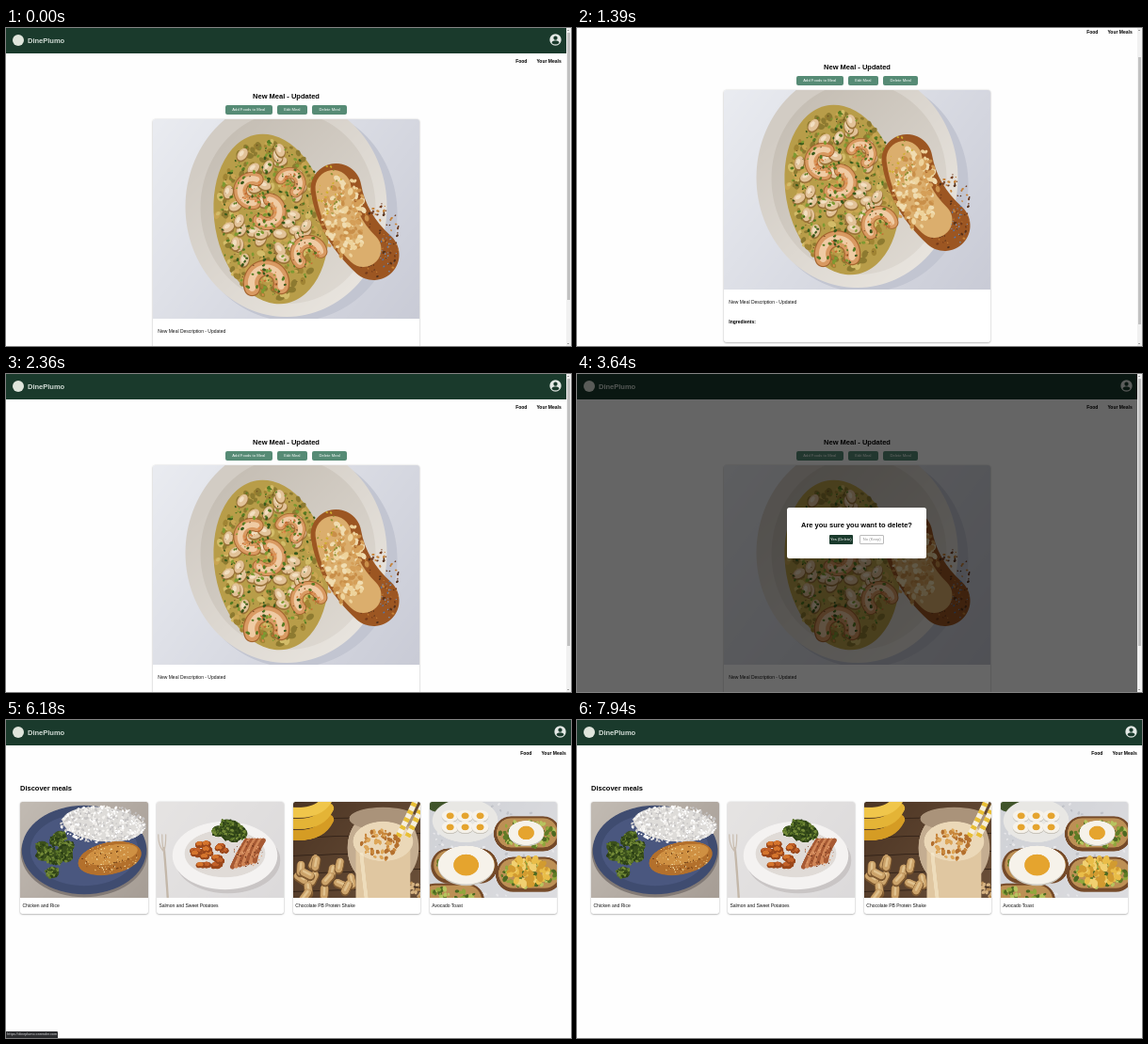
These frames come from a looping animation (600 by 338 pixels, 8000 ms). An HTML page with a canvas:

```html
<!DOCTYPE html>
<html lang="en">
<head>
<meta charset="utf-8">
<title>Meal planner</title>
<style>
html, body { margin: 0; width: 100%; height: 100%; overflow: hidden; background: #fefefe; }
#stage { position: absolute; left: 0; top: 0; width: 600px; height: 338px; overflow: hidden;
  background: #fefefe; font: 5px/10px "Liberation Sans", Arial, sans-serif; color: #111; white-space: nowrap; }
#stage div, canvas { position: absolute; box-sizing: border-box; }
.fill { left: 0; top: 0; width: 100%; height: 100%; }
.b { font-weight: bold; color: #000; }
.h { font-size: 7.5px; }
.mid { left: 0; width: 100%; text-align: center; }
.bar { left: 0; top: 0; width: 100%; height: 27px; background: #1a3a2c; }
.logo { left: 7px; top: 6.5px; width: 12px; height: 12px; border-radius: 50%; background: #dfe5dc; }
#stage .row { display: flex; justify-content: center; gap: 5px; }
#stage .row div { position: static; height: 10px; padding: 0 7.5px; font-size: 4.167px;
  color: #fff; background: #568b75; border-radius: 2px; }
#modal .row { gap: 7.5px; }
#stage #modal .row div { padding: 0 1.2px; background: #1a3a2c; border-radius: 1px; }
#stage #modal .row .no { padding: 0 2.4px; line-height: 8px; background: #fff; color: #8b8b8b; border: 1px solid #bbb; }
.card { background: #fff; border-radius: 2.5px; overflow: hidden; box-shadow: 0 .6px 1.8px rgba(0,0,0,.42); }
#page { left: 0; top: 0; height: 338px; }
#shade { left: 0; top: 0; width: 595px; height: 338px; background: rgba(0,0,0,.6); }
#modal { left: 223px; top: 142px; width: 148px; height: 54px; background: #fff; border-radius: 2.5px; }
#track { left: 595px; top: 0; width: 5px; height: 338px; background: #f1f1f1; }
#thumb { left: .6px; width: 3.8px; height: 284px; background: #c1c1c1; }
.arrow { left: 1.2px; border: 1.3px solid transparent; }
#link { left: 0; bottom: 0; padding: 0 1.3px; background: #2b2c2e; color: #d4d5d7;
  font: 3.7px/7px Roboto, "Open Sans", sans-serif; border-top-right-radius: 1px; }
</style>
</head>
<body>
<div id="stage">
  <div id="page">
    <div class="bar"></div>
    <div class="logo"></div>
    <div class="b h" style="left:23px;top:8.7px;color:#d3ddd7">DinePlumo</div>
    <canvas id="user" style="right:5px;top:6px"></canvas>
    <div class="b" style="right:41.6px;top:30px">Food</div>
    <div class="b" style="right:5.3px;top:30px">Your Meals</div>

    <div id="detail" class="fill">
      <div class="b h mid" style="top:67.5px">New Meal - Updated</div>
      <div class="row mid" style="top:82px"><div>Add Foods to Meal</div><div>Edit Meal</div><div>Delete Meal</div></div>
      <div class="card" style="left:156px;top:97px;width:283px;height:268px">
        <canvas id="meal"></canvas>
        <div style="left:5.3px;top:219.7px">New Meal Description - Updated</div>
        <div class="b" style="left:5.3px;top:240.5px">Ingredients:</div>
      </div>
    </div>

    <div id="list" class="fill">
      <div class="b h" style="left:15px;top:67.5px">Discover meals</div>
    </div>
  </div>

  <div id="shade">
    <div id="modal">
      <div class="b h mid" style="top:14.2px">Are you sure you want to delete?</div>
      <div class="row mid" style="top:29px"><div>Yes (Delete)</div><div class="no">No (Keep)</div></div>
    </div>
  </div>
  <div id="track">
    <div class="arrow" style="top:.6px;border-bottom-color:#555"></div>
    <div id="thumb"></div>
    <div class="arrow" style="bottom:.6px;border-top-color:#555"></div>
  </div>
  <div id="link"></div>
</div>

<script>
const $ = id => document.getElementById(id);
const TAU = Math.PI * 2;
let c, seed;

function rnd() {
  seed = (seed * 1664525 + 1013904223) >>> 0;
  return seed / 4294967296;
}
const between = (a, b) => a + (b - a) * rnd();
const pick = list => list[Math.floor(rnd() * list.length)];

// Photos are drawn with 0, 0 at the centre of the picture.
function paint(el, w, h, draw) {
  el.width = w * 2;
  el.height = h * 2;
  el.style.width = w + "px";
  el.style.height = h + "px";
  c = el.getContext("2d");
  c.scale(2, 2);
  c.translate(w / 2, h / 2);
  seed = 77;
  draw(w, h);
}
function fade(w, h, from, to) {
  const g = c.createLinearGradient(-w / 2, -h / 2, w / 2, h / 2);
  g.addColorStop(0, from);
  g.addColorStop(1, to);
  return g;
}
function wash(w, h, from, to) {
  c.fillStyle = fade(w, h, from, to);
  c.fillRect(-w / 2, -h / 2, w, h);
}
function oval(x, y, rx, ry, fill, rot = 0) {
  c.fillStyle = fill;
  c.beginPath();
  c.ellipse(x, y, rx, ry, rot, 0, TAU);
  c.fill();
}
function bend(x0, y0, mx, my, x1, y1, width, color, cap = "round") {
  c.beginPath();
  c.moveTo(x0, y0);
  c.quadraticCurveTo(mx, my, x1, y1);
  c.lineWidth = width;
  c.strokeStyle = color;
  c.lineCap = cap;
  c.stroke();
}
// Calls draw at n random places inside an oval.
function strew(n, x, y, rx, ry, draw) {
  for (let i = 0; i < n; i++) {
    const a = rnd() * TAU, d = Math.sqrt(rnd());
    draw(x + Math.cos(a) * d * rx, y + Math.sin(a) * d * ry);
  }
}
function specks(n, x, y, rx, ry, size, colors) {
  strew(n, x, y, rx, ry, (px, py) => {
    const s = size * between(.4, 1);
    oval(px, py, s, s * .7, pick(colors), rnd() * 3);
  });
}
function shrimp(x, y, r, turn) {
  [[r * 1.1, "#a5652f"], [r * .95, "#d99a62"], [r * .45, "#efcba4"]].forEach(([width, color]) => {
    c.beginPath();
    c.arc(x, y, r, turn, turn + 3.7);
    c.lineWidth = width;
    c.strokeStyle = color;
    c.lineCap = "round";
    c.stroke();
  });
  specks(20, x, y, r, r, 1.6, ["#c46c32", "#dd8d4c"]);
}

const HERBS = ["#557b22", "#38591a", "#7d9a32"];
const CRUMB = ["#eed39c", "#c98f49", "#f0dcb0", "#d59f58"];

function stew(w, h) {
  wash(w, h, "#eaecf1", "#c9cbd6");
  oval(8, -6, 110, 115, "#c2c5d1");
  oval(0, -13, 107, 117, fade(150, 150, "#d2ccc4", "#e8e4de"));
  oval(2, -12, 93, 102, fade(150, 150, "#c6bfb5", "#dfdad3"));
  oval(-16, 0, 60, 91, "#b89d49", -.17);
  specks(260, -17, 0, 57, 86, 5, ["#a08433", "#d3bc69", "#8d7a30", "#c9a552"]);
  strew(38, -22, -14, 50, 66, (x, y) => {
    const turn = rnd() * 3;
    oval(x, y + 1, 7.8, 5.5, "#9a7238", turn);
    oval(x, y, 7, 4.8, "#e2c298", turn);
    oval(x - 1, y - 1, 3.5, 2, "#f2dfc1", turn);
  });
  shrimp(-36, -30, 13, 1.4);
  shrimp(-20, -8, 13, 4.9);
  shrimp(4, -38, 11, 3.6);
  shrimp(-21, 68, 16, 2.8);
  shrimp(24, 37, 13, 2.4);
  specks(240, -16, -2, 56, 84, 2.2, HERBS);
  specks(90, -16, -2, 56, 84, .9, ["#463018", "#6b4a20"]);
  bend(53, -32, 60, 8, 93, 38, 54, "#9c5622");
  specks(90, 98, 24, 24, 42, 1.7, ["#71391a", "#c78238", "#54301a"]);
  bend(50, -33, 55, 6, 82, 32, 38, "#dbae6d");
  specks(150, 62, -2, 24, 44, 4.2, CRUMB);
  specks(40, 46, -30, 14, 28, 1.5, ["#8d9135", "#d1b02e"]);
  specks(24, 108, 36, 9, 23, 1.1, ["#4c78b4", "#7795bd"]);
}
function broccoli(n, x, y, rx, ry) {
  strew(n, x, y, rx, ry, (px, py) => {
    oval(px, py, 7, 6, "#3c511d");
    specks(25, px, py, 7, 6, 2, ["#5c7629", "#2c4016", "#748a38"]);
  });
}
function chicken(w, h) {
  wash(w, h, "#c2bbb3", "#a69d95");
  oval(0, 3, 67, 47, "#827a76");
  oval(0, 0, 66, 47, "#3f4c70");
  oval(0, 0, 57, 38, "#4a577f");
  oval(20, -27, 43, 18, "#dedcd9", .1);
  specks(450, 20, -27, 45, 20, 1.8, ["#fff", "#f4f2ef", "#c6c4c4"]);
  broccoli(14, -32, 6, 18, 22);
  oval(27, 9, 34, 17, "#b3702c", -.2);
  oval(29, 5, 28, 10, "#cf9042", -.2);
  specks(130, 27, 9, 30, 15, 1, ["#f0d8a0", "#704018", "#e2b568"]);
}
function salmon(w, h) {
  wash(w, h, "#e6e4e3", "#dcdadb");
  bend(-60, -2, -58, 20, -56, 50, 2.3, "#c3b7a9");
  for (let x = -66; x < -56; x += 4) bend(x, -16, x, -4, -60, 2, 1.2, "#c9bdb0");
  oval(8, 11, 56, 35, "#c9c5c5");
  oval(5, 6, 56, 36, "#f4f2f1");
  oval(5, 4, 43, 25, "#e0dbd7");
  broccoli(7, 9, -20, 14, 8);
  strew(28, -12, 4, 17, 14, (x, y) => {
    bend(x - 2, y + 1, x, y, x + 2, y + 1, 6, "#9a471b");
    bend(x - 2, y, x, y - 1, x + 1, y, 4, pick(["#d5752d", "#c2612a"]));
  });
  for (let i = 0; i < 7; i++)
    bend(13 + i * 4, 18 - i, 20 + i * 3, 2, 28 + i * 3, -10, 5, i % 2 ? "#d08556" : "#a75a34");
  specks(60, 29, 5, 16, 14, 1.2, ["#773b20", "#e3a070"]);
}
function shake(w, h) {
  wash(w, h, "#4c3524", "#6b5039");
  for (let y = -h / 2; y < h / 2; y += 19) bend(-w / 2, y, 0, y - 2, w / 2, y - 5, 1, "#36251a");
  for (let i = 0; i < 3; i++)
    bend(-73, -16 - i * 12, -40, -12 - i * 12, -30, -32 - i * 12, 11, ["#d59c24", "#e4b436", "#f0c64b"][i]);
  strew(15, -33, 32, 32, 24, (x, y) => {
    const a = rnd() * 3, dx = Math.cos(a) * 4, dy = Math.sin(a) * 4;
    [[9.5, 1, "#7d5830"], [7.7, 0, "#cca36a"], [2.5, -1, "#e1c28e"]].forEach(([k, down, color]) =>
      bend(x - dx, y - dy + down, x, y + down, x + dx, y + dy + down, k, color));
  });
  specks(50, 57, 44, 13, 10, 2.5, ["#d7b483", "#b98e58"]);
  oval(28, -2, 38, 42, "#c4ad91");
  c.fillStyle = "#e0c7a1";
  c.fillRect(-1, -5, 58, 60);
  oval(28, -33, 36, 12, "#aa937a");
  oval(28, -9, 32, 21, "#ebd8b8");
  bend(5, 5, 7, 26, 10, 50, 4, "rgba(255,245,220,.45)");
  for (let x = 44; x < 56; x += 10) {
    bend(x, -14, x + 10, -33, x + 20, -55, 6, "#f5eedd", "butt");
    c.setLineDash([4, 5]);
    bend(x, -14, x + 10, -33, x + 20, -55, 6, "#e8be35", "butt");
    c.setLineDash([]);
  }
  specks(65, 25, -6, 20, 16, 3.2, ["#c8873d", "#dda557", "#b4702e"]);
}
function slice(x, y) {
  bend(x - 17, y, x, y, x + 17, y, 37, "#754a29");
  bend(x - 17, y - 1, x, y - 1, x + 17, y - 1, 31, "#bd9055");
  specks(80, x, y, 29, 14, 3.5, ["#91a83c", "#607c26", "#b6c45f", "#4d6921"]);
}
function egg(x, y, r) {
  oval(x, y + 1, r, r * .7, "#c9c5bc");
  oval(x, y, r, r * .68, "#f6f2ea");
  oval(x, y, r * .45, r * .38, "#e5a42e");
}
function toast(w, h) {
  wash(w, h, "#cfd1d6", "#dddde0");
  specks(90, 0, 0, 70, 55, 2, ["#c0c2c8", "#e7e7ea"]);
  oval(-58, -47, 12, 7, "#40542a");
  oval(-30, -31, 35, 23, "#e8e7e4");
  for (let i = 0; i < 6; i++) egg(-46 + i % 3 * 16, -36 + Math.floor(i / 3) * 12, 9);
  slice(36, -17);
  slice(-31, 17);
  slice(38, 26);
  slice(-45, 54);
  egg(35, -18, 19);
  egg(-29, 16, 30);
  specks(75, 38, 23, 21, 14, 5, ["#e9bd49", "#f1d071", "#d29b30"]);
}

paint($("user"), 13, 13, () => {
  oval(0, 0, 6.1, 6.1, "#e4e9e6");
  oval(0, -1.9, 2.1, 2.1, "#1a3a2c");
  oval(0, 2.9, 3.9, 2, "#1a3a2c");
});
paint($("meal"), 283, 212, stew);

function add(parent, tag, css) {
  const el = document.createElement(tag);
  el.style.cssText = css;
  parent.append(el);
  return el;
}
[["Chicken and Rice", chicken], ["Salmon and Sweet Potatoes", salmon],
  ["Chocolate PB Protein Shake", shake], ["Avocado Toast", toast]].forEach(([name, draw], i) => {
  const card = add($("list"), "div", `left:${15 + i * 144.9}px;top:87px;width:135.5px;height:118.5px`);
  card.className = "card";
  paint(add(card, "canvas", ""), 135.5, 101.5, draw);
  add(card, "div", "left:2.5px;top:105.3px").textContent = name;
});

const LOOP = 8000, OPEN = 2900, DELETED = 4500;
const HOME = "https://dineplumo.onrender.com";
const ramp = (t, a, b) => Math.min(1, Math.max(0, (t - a) / (b - a)));
const ease = k => k * k * (3 - 2 * k);
const show = (id, on) => { $(id).style.display = on ? "block" : "none"; };

function frame() {
  const t = performance.now() % LOOP;
  const detail = t < DELETED;
  const scroll = 31 * (ease(ramp(t, 1020, 1200)) - ease(ramp(t, 1460, 1630)));
  show("detail", detail);
  show("list", !detail);
  show("track", detail);
  show("shade", t >= OPEN && detail);
  $("page").style.width = (detail ? 595 : 600) + "px";
  $("page").style.top = -scroll + "px";
  $("thumb").style.top = 5 + scroll * .84 + "px";
  $("link").textContent = t < 6690 ? HOME : HOME + "/meals/4";
  $("link").style.opacity = ramp(t, 5400, 5500) - ramp(t, 7330, 7430);
  requestAnimationFrame(frame);
}
frame();
</script>
</body>
</html>
```
